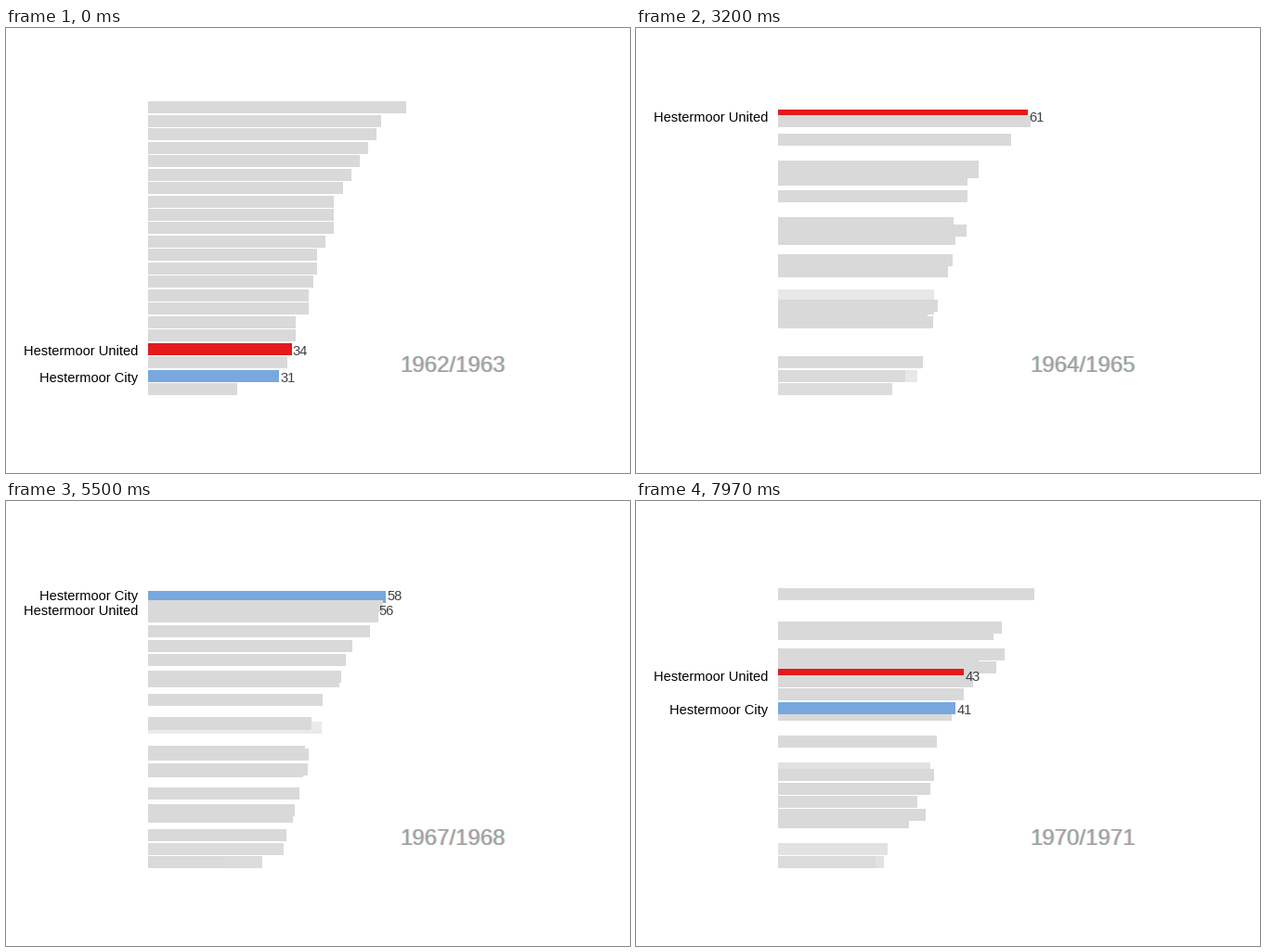
Write a matplotlib script that moves like this. It is 672x480 px and loops after 8000 ms.

```python
import math

import matplotlib.pyplot as plt
from matplotlib.animation import FuncAnimation
from matplotlib.patches import Rectangle

plt.rcParams["font.family"] = "Liberation Sans"

W, H, DPI = 672, 480, 96
FPS, FRAMES = 30, 240
PERIOD, STEPS = 35, 10          # frames per season, frames per transition

GREY, RED, BLUE = "#D9D9D9", "#E41A1C", "#77A8DE"
COLORS = {"M": RED, "C": BLUE}
NAMES = {"M": "Hestermoor United", "C": "Hestermoor City"}

# Final tables: points -> clubs (one letter each), best first
SEASONS = {
    1962: {61: "E", 55: "T", 54: "B", 52: "L", 50: "W", 48: "S", 46: "A",
           44: "PFK", 42: "R", 40: "HQ", 39: "J", 38: "VG", 35: "IO",
           34: "M", 33: "N", 31: "C", 21: "Y"},
    1963: {57: "P", 53: "M", 52: "E", 51: "T", 50: "X", 49: "S", 46: "R",
           45: "A", 44: "B", 43: "JLK", 41: "F", 40: "H", 39: "GW",
           38: "Z", 35: "Q", 34: "V", 29: "N", 28: "O", 25: "I"},
    1964: {61: "MD", 56: "X", 49: "E", 47: "F", 45: "T", 44: "P", 43: "S",
           42: "HRZB", 41: "A", 39: "J", 37: "UV", 35: "QLK", 34: "G",
           30: "W", 27: "N"},
    1965: {61: "P", 55: "DB", 51: "MX", 50: "J", 49: "L", 44: "T", 43: "K",
           42: "Z", 41: "E", 39: "H", 37: "QAn", 36: "VSFU", 35: "G",
           33: "p", 20: "R"},
    1967: {58: "C", 56: "M", 55: "P", 53: "D", 52: "E", 48: "X", 47: "T",
           46: "J", 44: "A", 41: "n", 39: "F", 38: "HLB", 37: "Us",
           36: "W", 35: "Z", 34: "S", 33: "c", 32: "K", 27: "G"},
    1968: {67: "D", 61: "P", 57: "E", 56: "A", 50: "X", 45: "Ts", 44: "Hn",
           43: "J", 42: "M", 41: "I", 40: "C", 39: "B", 36: "S", 35: "W",
           34: "U", 33: "FZ", 31: "c", 30: "L", 18: "q"},
    1969: {66: "E", 57: "D", 55: "X", 53: "d", 51: "P", 49: "c", 47: "n",
           45: "MZ", 43: "CT", 42: "A", 40: "W", 39: "B", 38: "F", 37: "J",
           36: "H", 31: "I", 29: "s", 27: "k", 26: "U", 25: "S"},
    1970: {65: "A", 64: "D", 52: "TW", 51: "PX", 46: "s", 43: "M",
           42: "dc", 41: "Cn", 37: "ZE", 36: "hF", 35: "Jk", 34: "IH",
           27: "B", 23: "Q"},
}
YEARS = list(SEASONS)


def standings(table):
    """Map club -> (row, points), in table order."""
    order = [(club, pts) for pts, clubs in table.items() for club in clubs]
    return {club: (row, pts) for row, (club, pts) in enumerate(order)}


BARS = [standings(table) for table in SEASONS.values()]
# Labels are paired by their order in the table, not by club
LABELS = [[(club, *bars[club]) for club in bars if club in NAMES]
          for bars in BARS]

fig = plt.figure(figsize=(W / DPI, H / DPI), dpi=DPI, facecolor="white")
ax = fig.add_axes([0, 0, 1, 1])
ax.set_xlim(0, W)
ax.set_ylim(H, 0)
ax.axis("off")


def snap(v):
    return math.floor(v + 0.5)


def bar_end(pts):
    return 152.74 + 4.56 * pts


def bar_top(row):
    return 79.22 + 14.47 * row


def tween(a, b, t):
    """Blend two (row, points) pairs; a missing one fades in or out."""
    if a is None:
        return *b, 0.5 + 0.5 * t
    if b is None:
        return *a, 1 - 0.5 * t
    return a[0] + (b[0] - a[0]) * t, a[1] + (b[1] - a[1]) * t, 1


def draw_bar(club, row, pts, alpha):
    ax.add_patch(Rectangle((153, snap(bar_top(row))), snap(bar_end(pts)) - 153,
                           13, fc=COLORS.get(club, GREY), lw=0, alpha=alpha,
                           antialiased=False))


def draw_label(club, value, row, pts, alpha):
    y = bar_top(row) + 13.4
    ax.text(142, y, NAMES[club], size=11, color="black", ha="right",
            va="baseline", alpha=alpha)
    ax.text(bar_end(pts) + 1, y, str(value), size=11, color="#404040",
            ha="left", va="baseline", alpha=alpha)


def draw_season(year):
    # Coloured fringes left and right of the grey digits
    for dx, color, alpha in ((-1, "#F0A090", 0.5), (1, "#80D8D8", 0.5),
                             (0, "#A0A0A0", 1)):
        ax.text(424.4 + dx, 371, f"{year}/{year + 1}", size=18, color=color,
                ha="left", va="baseline", alpha=alpha)


def at(items, i):
    return items[i] if i < len(items) else None


def update(n):
    for artist in [*ax.patches, *ax.texts]:
        artist.remove()

    new, j = divmod(n + STEPS, PERIOD)
    t = min((j + 1) / STEPS, 1)
    old = new if t == 1 else new - 1
    near = new if t >= 0.5 else old

    for club in {**BARS[old], **BARS[new]}:
        draw_bar(club, *tween(BARS[old].get(club), BARS[new].get(club), t))

    for i in range(max(len(LABELS[old]), len(LABELS[new]))):
        a, b = at(LABELS[old], i), at(LABELS[new], i)
        club, _, value = at(LABELS[near], i) or a or b
        draw_label(club, value, *tween(a and a[1:], b and b[1:], t))

    draw_season(YEARS[near])
    return [*ax.patches, *ax.texts]


anim = FuncAnimation(fig, update, frames=FRAMES, interval=1000 / FPS,
                     init_func=lambda: update(0), repeat=True,
                     repeat_delay=0, blit=False)
plt.show()
```
